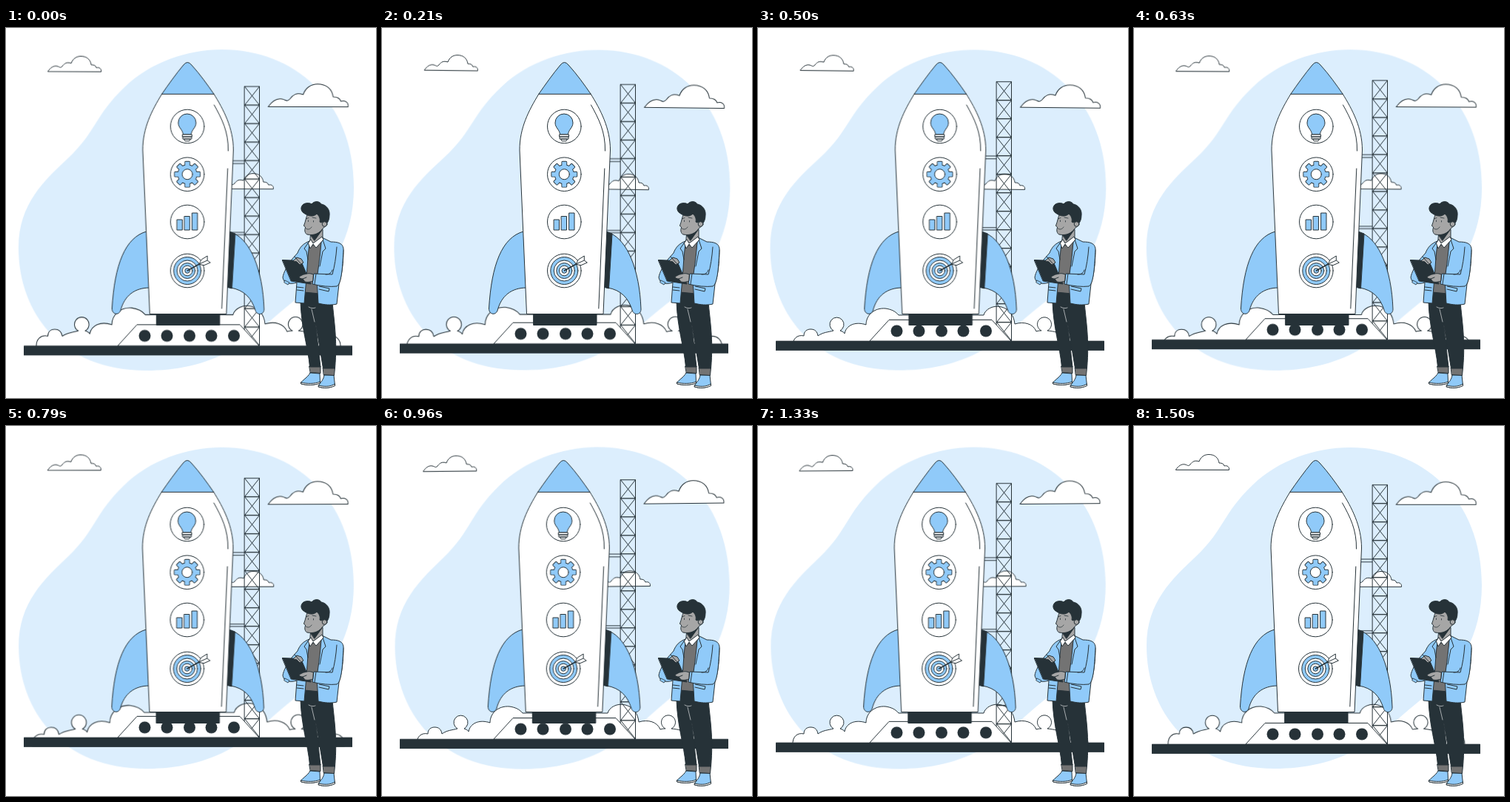
Write an HTML page without scripts that moves like this. It is 500x500 px and loops after 1540 ms.

```html
<!DOCTYPE html>
<html lang="en">
<head>
<meta charset="utf-8">
<title>Rocket launch</title>
<style>
  html, body { margin: 0; width: 100%; height: 100%; overflow: hidden; background: #fff; }
  svg { display: block; width: 100%; height: 100%; }

  .line { stroke: #263238; stroke-width: 1; stroke-linecap: round; stroke-linejoin: round; }
  .blue { fill: #90caf9; }
  .white { fill: #fff; }
  .dark { fill: #263238; }
  .skin { fill: #a6a6a6; }
  .knit { fill: #737373; }
  .none { fill: none; }

  .sway, .float, .beat, .shake { animation: 1540ms linear -45ms infinite; }
  .sway { animation-name: sway; }
  .float { animation-name: float; }
  .beat { animation-name: beat; transform-origin: 246.5px 403px; }
  .shake { animation-name: shake; }
  .blob { transform-origin: 243px 246px; }
  .clouds { transform-origin: 260px 128px; }

  @keyframes sway {
    25% { transform: rotate(1deg); }
    75% { transform: rotate(-1deg); }
  }
  @keyframes float {
    50% { transform: translateY(-10px); }
  }
  @keyframes beat {
    0%, 30%, 40%, 60%, 100% { transform: scale(1); }
    10%, 50% { transform: scale(1.1); }
  }
  @keyframes shake {
    0%, 100% { transform: translateX(0); }
    10%, 90% { transform: translateX(-1px); }
    20%, 80% { transform: translateX(2px); }
    30%, 50%, 70% { transform: translateX(-4px); }
    40%, 60% { transform: translateX(4px); }
  }
</style>
</head>
<body>
<svg viewBox="0 0 500 500">
  <defs>
    <path id="cloud" d="M56.5 59C60 54 64 51 69 52C73 53 73 55 76 52C79 48 82 46 88 48C90 42 95 38.5 101 38.5C109 38.5 114 43 115 50C119 50 121 51 122 54C126 53 129 55 128.5 59Z"/>
    <path id="cell" d="M322.5 79.7H342.5V104.7H322.5ZL342.5 104.7M342.5 79.7L322.5 104.7"/>
    <g id="cells2"><use href="#cell"/><use href="#cell" y="25"/></g>
    <g id="cells4"><use href="#cells2"/><use href="#cells2" y="50"/></g>
    <rect id="tooth" x="-3" y="-17" width="6" height="8" rx=".6"/>
    <g id="teeth">
      <use href="#tooth"/>
      <use href="#tooth" transform="rotate(90)"/>
      <use href="#tooth" transform="rotate(180)"/>
      <use href="#tooth" transform="rotate(270)"/>
    </g>
    <g id="gear">
      <use href="#teeth"/>
      <use href="#teeth" transform="rotate(45)"/>
      <circle r="12.5"/>
    </g>
  </defs>

  <path class="sway blob" fill="#dceefd" d="M292 29C388 29 470 97 470 215C470 285 438 332 398 362C365 386 340 415 305 435C270 455 230 463 190 463C75 463 17 385 17 297C17 238 52 206 84 176C122 140 120 118 160 80C195 46 245 29 292 29Z"/>

  <g class="sway clouds line white">
    <use href="#cloud"/>
    <use href="#cloud" x="233" y="158"/>
    <use href="#cloud" transform="translate(269.5 17.7) scale(1.5)" stroke-width=".67"/>
  </g>

  <path class="beat line white" d="M47 431C46 420 53 414 62 416C62 410 66 407 71 407C77 407 80 410 81 416C88 411 95 411 102 409A9.5 9.5 0 1 1 111 409C114 410 116 411 117 413C119 402 131 396 146 401C146 388 157 378 172 379C180 380 186 383 190 388H305C307 380 318 374 329 377C340 380 346 389 347 400C360 396 372 400 376 410C379 409 381 409 383 409A9.5 9.5 0 1 1 391 409C400 410 407 411 412 416C414 408 428 406 431 416C440 414 447 421 446 431Z"/>

  <g class="float">
    <g class="line none">
      <path d="M305 180H322M305 183.800H322M301 276.800H322M301 280H322"/>
      <use href="#cells4"/>
      <use href="#cells4" y="100"/>
      <use href="#cells4" y="200"/>
      <use href="#cells2" y="300"/>
    </g>
    <path class="line white" d="M151 430L177 401.5H316L342 430Z"/>
    <g class="dark">
      <circle cx="187.5" cy="416.5" r="8"/>
      <circle cx="217.5" cy="416.5" r="8"/>
      <circle cx="248" cy="416.5" r="8"/>
      <circle cx="277.5" cy="416.5" r="8"/>
      <circle cx="308" cy="416.5" r="8"/>
      <rect x="24" y="429.7" width="444" height="13.3" rx=".5"/>
    </g>
  </g>

  <g class="shake line">
    <rect class="dark" x="204" y="386.500" width="85" height="15"/>
    <path class="blue" d="M190 275C161 283 147 320 143.5 379C143.500 387 152 389 155 382C160 362 174 351 194 351Z"/>
    <path class="blue" d="M309 278C330 288 347 325 349 380C349 388 339 389 337 381C332 365 322 354 304 351Z"/>
    <path class="dark" d="M302 275L310 278L305.5 352L298 350Z"/>
    <path class="white" d="M211 89C197 112 185 135 185 165L194.5 386.500H298L307.5 165C307.5 135 294 110 281 89Z"/>
    <path class="blue" d="M211 89C220 76 230 62 240 50Q245.5 43 251 50C262 62 272 76 281 89Z"/>
    <path class="none" d="M281.5 104C292 123 301 140 300.5 166M299.8 190L291.8 379"/>

    <g class="white">
      <circle cx="245.3" cy="133" r="22.8"/>
      <circle cx="245.3" cy="197.7" r="22.8"/>
      <circle cx="245.3" cy="262" r="22.8"/>
      <circle cx="245.3" cy="328" r="22.8"/>
    </g>

    <path class="blue" d="M239.5 143.5C239 137 233 135 233 128A12 12 0 0 1 257 128C257 135 251 137 250.5 143.5Z"/>
    <path class="white" d="M239 144H251.5V147H239ZM239.5 147H251V150H239.5ZM241 150H249.5L248 152.8H242.5Z"/>

    <g transform="translate(245.3 197.7)">
      <use href="#gear" class="dark" stroke-width="1.8"/>
      <use href="#gear" class="blue" stroke="none"/>
      <circle class="white" r="7"/>
    </g>

    <path class="blue" d="M231.5 259H238.5V273H231.5ZM241.5 254.5H248.5V273H241.5ZM252 250H259V273H252Z"/>

    <g transform="translate(245.3 328)">
      <circle class="blue" r="18.5"/>
      <circle class="white" r="14"/>
      <circle class="blue" r="10.5"/>
      <circle class="white" r="6.8"/>
      <circle class="blue" r="3.3"/>
      <path class="none" stroke-width="1.5" d="M0 0L18 -10"/>
      <path class="white" d="M16 -9L19 -15L27 -20L27 -14L31 -11L23 -7.5ZM16 -9L27 -14"/>
    </g>
  </g>

  <g class="line">
    <path class="blue" d="M411 466L424 467L424.5 479C418 483 408 483 399 481C397 477 407 474 411 466Z"/>
    <path class="blue" d="M430 469L443 469L444.5 483C437 487 429 487 422.5 485C422 480 429 478 430 469Z"/>
    <path class="white" d="M398.5 479C407 481 417 481 424.5 478V480C417 483 406 483 399 481ZM422.5 483C430 485 438 485 444.5 481V483.5C437 487 429 487 422.5 485Z"/>
    <path class="knit" d="M410 457H425V466.5L411.5 465.5ZM428.5 459H444.5L443.5 469.5L429.5 468.5Z"/>
    <path class="knit" d="M406 291L428 288L424 360L403 358Z"/>
    <path class="dark" d="M398 370L403 357L424 359L441 370C443 395 448 420 444.5 460H428.5L418 396L425 458H410.5C408 430 399 405 398 370Z"/>
    <path class="none" stroke-width=".6" d="M409 377C412 379 416 379 418 378M417 397L413 380" style="stroke:#fff"/>

    <path class="blue" d="M410 288C402 291 397 296 394 304L386 313C380 322 375 330 374 337C375 345 383 347 393 344L391 371L403 372L406 338L408 310Z"/>
    <path class="blue" d="M427 283L439 289C449 289 455 291 456 298C456 317 454 334 450 346L447 373C439 375 430 374 422 372L420 340L424 310Z"/>
    <path class="blue" d="M447 296C446 310 444 322 441 333L416 332L414 346C426 349 438 350 447 349C454 346 455 318 456 300"/>
    <path class="none" d="M427 283L432 298L428 302L424 322M410 288L403 298L406 302L408 313M423 349L437 352L436 356L423 353M393 350L402 351M393 354L402 355M419 332L417 346M432 333C437 333 440 331 441 327"/>
    <path class="skin" d="M412 276L428 272V285L414 294L411 288Z"/>
    <path class="dark" d="M412 280L427 273L417 287Z"/>
    <path class="white" d="M412 286L415 291L427 282L429 286L419 297L415 292L411 298L408.5 291Z"/>

    <path class="skin" d="M408 250C405 257 405 261 402.5 267C403 269 405 268 404.5 270C403 273 404 278 407 279C417 281 424 277 428 271L434 266L432 250L416 246Z"/>
    <path class="dark" d="M404 251C399 249 397 243 401 239C404 236 410 236 413 238C417 233 424 234 426 238C433 239 438 246 437 253C437 259 435 263 432 266L428 262L426 263L424 262C425 257 423 254 420 251C415 256 408 254 404 251Z"/>
    <circle class="skin" cx="430.5" cy="265" r="3.3"/>
    <path class="none" stroke-width=".8" d="M405.5 258L409 256.5M414 256L419 257M408.5 260V261.5M415.5 260.5V262M405.5 271C408 273 411 272 413 269"/>

    <path class="dark" d="M373.5 313.5L398.5 314.5L412 346L385.5 342Z"/>
    <path class="skin" d="M415 333C409 330 405 333 402 333L396 336C396 338 399 339 401 339L404 343C408 344 412 343 414.5 342Z"/>
    <path class="skin" d="M388 315L393 310L399 312L402 317L397 320L393 316Z"/>
    <path class="none" d="M390 309L398 318M401 339L406 337"/>
    <path class="blue" stroke-width=".8" d="M377 341L383 344L381 347L376 344Z"/>
  </g>
</svg>
</body>
</html>
```
